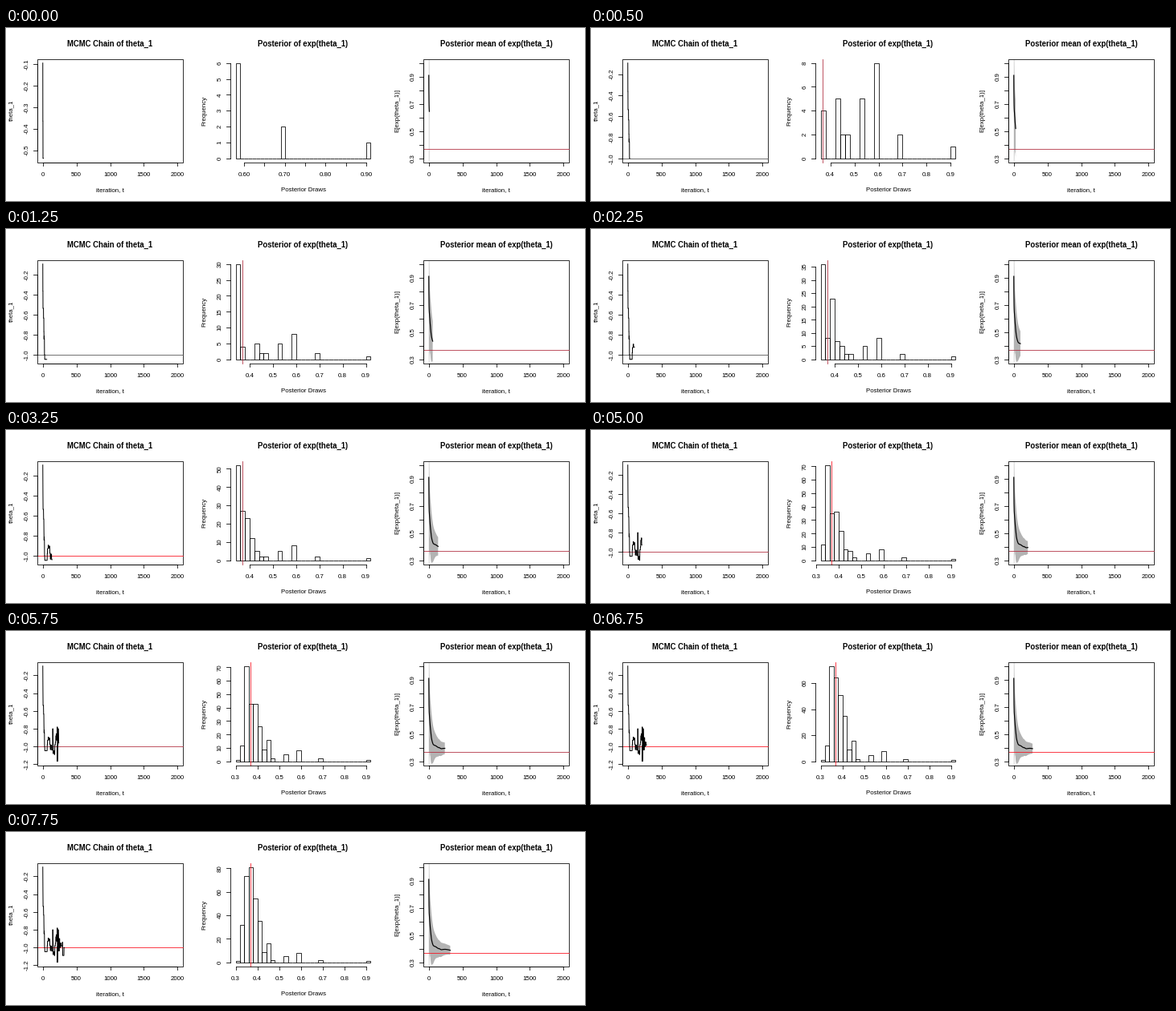
Animation of 720 by 216 pixels, one loop 8 s. Source, as a matplotlib script:

```python
import math

import matplotlib.pyplot as plt
import numpy as np
from matplotlib.animation import FuncAnimation
from matplotlib.patches import Rectangle

W, H = 720, 216
FRAMES, INTERVAL = 32, 250
PER_FRAME = 10

# One margin line of text; the plot margins are multiples of it.
FONT = 7.92
LINE = FONT * 1.2
LEFT, RIGHT = 4.1 * LINE, 240 - 2.1 * LINE
TOP, BOTTOM = 4.1 * LINE, H - 5.1 * LINE
LW = 0.8

TRUTH = -1.0
RED, CRIMSON, GREY, BAND = "#fb0d1b", "#b02a3c", "#505050", "#b3b3b3"

# The chain as (value, number of iterations it stays there).
RUNS = [
    (-0.095, 1), (-0.365, 2), (-0.538, 8), (-0.635, 5), (-0.77, 2),
    (-0.845, 2), (-0.815, 2), (-0.845, 3), (-1.0, 4), (-1.047, 36),
    (-0.98, 4), (-0.93, 11), (-0.895, 7), (-0.925, 12), (-0.905, 5),
    (-0.975, 7), (-1.035, 7), (-0.985, 12), (-1.04, 16), (-0.8, 5),
    (-0.93, 3), (-1.08, 5), (-1.05, 12), (-1.09, 7), (-0.98, 8),
    (-0.95, 6), (-0.88, 10), (-0.855, 3), (-0.93, 4), (-0.89, 4),
    (-0.78, 4), (-1.167, 1), (-0.99, 8), (-0.8, 5), (-0.85, 1),
    (-0.96, 8), (-1.04, 2), (-0.9, 9), (-1.0, 11), (-0.95, 7),
    (-0.985, 22), (-0.94, 3), (-1.09, 20), (-1.0, 5),
]
theta = np.repeat([v for v, _ in RUNS], [n for _, n in RUNS])
draws = np.exp(theta)
steps = np.arange(1, len(theta) + 1)
mean = np.cumsum(draws) / steps
spread = np.sqrt(np.maximum(np.cumsum(draws ** 2) / steps - mean ** 2, 0))
half = 9.6 * spread / np.sqrt(steps)

plt.rcParams["font.family"] = "Liberation Sans"
fig = plt.figure(figsize=(W / 72, H / 72), dpi=72, facecolor="white")
ax = fig.add_axes([0, 0, 1, 1])


def tick_step(span):
    cell = span * 1.08 / 5
    base = 10 ** math.floor(math.log10(cell))
    ratio = cell / base
    for limit, unit in ((1.556, 1), (3.111, 2), (7.778, 5)):
        if ratio < limit:
            return unit * base
    return 10 * base


def ticks(lo, hi):
    pad = 0.04 * (hi - lo)
    step = tick_step(hi - lo)
    first = math.ceil((lo - pad) / step - 1e-9)
    last = math.floor((hi + pad) / step + 1e-9)
    places = max(0, -math.floor(math.log10(step) + 1e-9))
    return [(k * step, f"{k * step:.{places}f}") for k in range(first, last + 1)]


def text_width(label):
    return FONT * sum({".": 0.278, "-": 0.333}.get(c, 0.556) for c in label)


def write(x, y, s, rotation=0, **style):
    ax.text(x, y, s, ha="center", va="baseline", rotation=rotation,
            rotation_mode="anchor", **{"fontsize": FONT, **style})


def line(xs, ys, color="black", lw=LW, **style):
    return ax.plot(xs, ys, color=color, lw=lw, **style)[0]


class Panel:
    """One plot region that maps data to stage pixels."""

    def __init__(self, column, xlim, ylim):
        self.left, self.right = 240 * column + LEFT, 240 * column + RIGHT
        self.xlim, self.ylim = xlim, ylim
        self.clip = Rectangle((self.left, TOP), self.right - self.left,
                              BOTTOM - TOP, transform=ax.transData)

    def x(self, v):
        lo, hi = self.xlim
        width = self.right - self.left
        return self.left + width * (0.04 + (np.asarray(v) - lo) / (hi - lo)) / 1.08

    def y(self, v):
        lo, hi = self.ylim
        return BOTTOM - (BOTTOM - TOP) * (0.04 + (np.asarray(v) - lo) / (hi - lo)) / 1.08

    def axes(self, title, xlabel, ylabel):
        middle = (self.left + self.right) / 2
        write(middle, 22.9, title, fontsize=FONT * 1.2, fontweight="bold")
        write(middle, BOTTOM + 3.8 * LINE, xlabel)
        write(self.left - 3.2 * LINE, (TOP + BOTTOM) / 2, ylabel, 90)

        end = -math.inf
        marks = [(float(self.x(v)), s) for v, s in ticks(*self.xlim)]
        line([marks[0][0], marks[-1][0]], [BOTTOM] * 2)
        for x, s in marks:
            line([x, x], [BOTTOM, BOTTOM + LINE / 2])
            w = text_width(s) / 2
            if x - w - end > 10.5:
                write(x, BOTTOM + 1.8 * LINE, s)
                end = x + w

        end = math.inf
        marks = [(float(self.y(v)), s) for v, s in ticks(*self.ylim)]
        line([self.left] * 2, [marks[0][0], marks[-1][0]])
        for y, s in marks:
            line([self.left - LINE / 2, self.left], [y, y])
            w = text_width(s) / 2
            if end - y - w > 6.6:
                write(self.left - 1.2 * LINE, y, s, 90)
                end = y - w

    def box(self):
        ax.add_patch(Rectangle((self.left, TOP), self.right - self.left,
                               BOTTOM - TOP, fill=False, lw=LW))

    def hline(self, v, color):
        y = float(self.y(v))
        if TOP < y < BOTTOM:
            line([self.left, self.right], [y, y], color)

    def vline(self, v, color):
        x = float(self.x(v))
        if self.left < x < self.right:
            line([x, x], [TOP, BOTTOM], color)


def draw_chain(n, color):
    past = theta[:n]
    p = Panel(0, (0, 2000), (past.min(), past.max()))
    p.hline(TRUTH, color)
    line(p.x(steps[:n]), p.y(past), lw=1, solid_joinstyle="round")
    p.box()
    p.axes("MCMC Chain of theta_1", "iteration, t", "theta_1")


def draw_histogram(n, color):
    past = draws[:n]
    low, high = past.min(), past.max()
    width = 0.01 if high - low < 0.42 else 0.02
    edges = np.arange(math.floor(low / width), math.ceil(high / width) + 1) * width
    counts, _ = np.histogram(past, edges)
    p = Panel(1, (edges[0], edges[-1]), (0, counts.max()))
    xs, base = p.x(edges), float(p.y(0))
    for a, b, top in zip(xs, xs[1:], p.y(counts)):
        ax.add_patch(Rectangle((a, top), b - a, base - top, fill=False, lw=LW))
    p.vline(math.exp(TRUTH), color)
    p.axes("Posterior of exp(theta_1)", "Posterior Draws", "Frequency")


def draw_mean(n, color):
    p = Panel(2, (0, 2000), (0.3, 1.0))
    xs, m, h = p.x(steps[:n]), mean[:n], half[:n]
    band = ax.fill_between(xs[1:], p.y(m + h)[1:], p.y(m - h)[1:], color=BAND, lw=0)
    band.set_clip_path(p.clip)
    p.hline(math.exp(TRUTH), color)
    line(xs, p.y(m), lw=1.2)
    p.box()
    p.axes("Posterior mean of exp(theta_1)", "iteration, t", "E[exp(theta_1)]")


def draw(i):
    ax.clear()
    ax.set(xlim=(0, W), ylim=(H, 0))
    ax.axis("off")
    n = PER_FRAME * (i + 1) - 1
    late = i >= 24
    chain_color = GREY if i < 12 else CRIMSON if 17 <= i < 24 else RED
    draw_chain(n, chain_color)
    draw_histogram(n, RED if i >= 17 else CRIMSON)
    draw_mean(n, RED if late else CRIMSON)
    return []


anim = FuncAnimation(fig, draw, frames=FRAMES, interval=INTERVAL,
                     init_func=lambda: [], repeat=True, repeat_delay=0)
plt.show()
```
